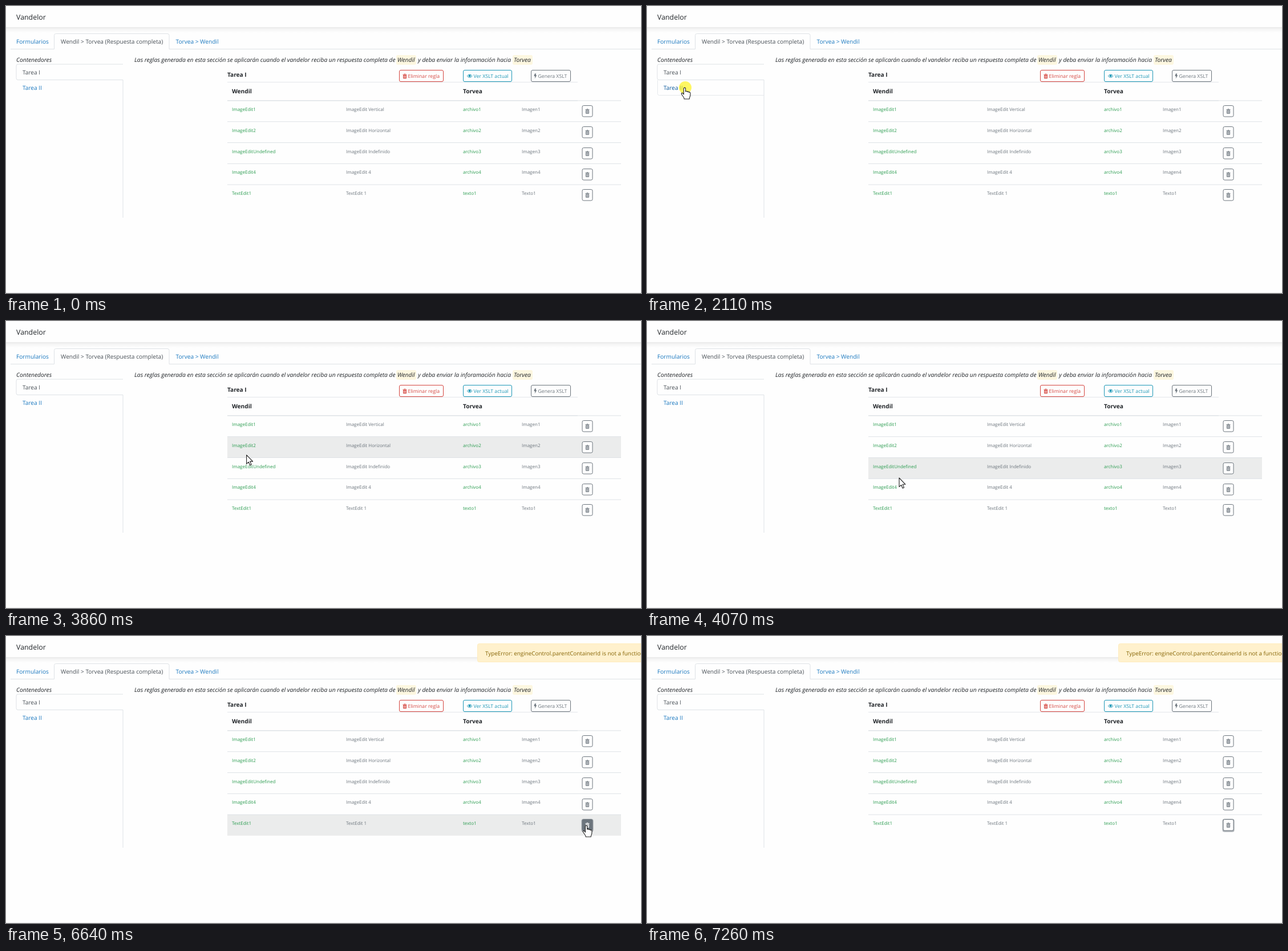
An HTML page for the animation above (8 s loop, 1113 by 503 pixels).

```html
<!DOCTYPE html>
<html lang="es">
<head>
<meta charset="utf-8">
<title>Vandelor</title>
<style>
  html, body { margin: 0; width: 100%; height: 100%; overflow: hidden; background: #fefefe; }
  svg { display: block; width: 1113px; height: 503px; }
  text { font-family: "Open Sans", "Noto Sans", sans-serif; font-size: 10.15px; white-space: pre; text-rendering: geometricPrecision; fill: #212529; }
  .title { font-size: 12.4px; }
  .link { fill: #1a78bf; }
  .link.over { fill: #0d5a9c; }
  .tab { fill: #495057; }
  .note { font-style: italic; font-size: 10.27px; }
  .bold { font-weight: 700; }
  .cell { font-size: 8px; fill: #6c757d; }
  .key { fill: #2b9c50; }
  .btn { font-size: 8.7px; fill: currentColor; }
  .toast { font-size: 9.85px; fill: #856404; }
  .mark { fill: #fdf7e0; }
  .line { fill: none; stroke: #dee2e6; }
  .frame { fill: #fefefe; stroke: currentColor; }
  .red { color: #d5453f; }
  .cyan { color: #1c97b6; }
  .grey { color: #6c757d; }
  .dark .frame { fill: #6c757d; }
  .dark .icon { color: #fff; }
  .row { fill: #ebecec; }
</style>
</head>
<body>
<svg id="stage" viewBox="0 0 1113 503">
  <defs>
    <linearGradient id="shade" x2="0" y2="1">
      <stop offset="0" stop-opacity=".08"/>
      <stop offset=".4" stop-opacity=".035"/>
      <stop offset="1" stop-opacity="0"/>
    </linearGradient>
    <path id="trash" fill="currentColor" fill-rule="evenodd"
      d="M.3 1.3H2.4L2.9 .3H5.1L5.6 1.3H7.7V2.1H.3ZM3.1 1.3H4.9L4.7 .9H3.3ZM1 2.6H7V8Q7 8.8 6.2 8.8H1.8Q1 8.8 1 8ZM2 3.5V7.7H2.7V3.5ZM3.65 3.5V7.7H4.35V3.5ZM5.3 3.5V7.7H6V3.5Z"/>
    <g id="eye">
      <path fill="none" stroke="currentColor" d="M.4 4.2C2.4 .7 6.8 .7 8.8 4.2C6.8 7.6 2.4 7.6 .4 4.2Z"/>
      <circle cx="4.6" cy="3.9" r="1.9" fill="currentColor"/>
    </g>
    <path id="bolt" fill="currentColor" d="M1.8 0H4.3L3.3 2.8H5.3L1.7 9L2.4 4.5H.4Z"/>
  </defs>
</svg>
<script>
const LOOP = 8000, STEP = 67;
const ROW_X = 388, ROW_END = 1078, ROW_Y = 165.9, ROW_H = 36.8;
const rows = [
  ["ImageEdit1", "ImageEdit Vertical", "archivo1", "Imagen1"],
  ["ImageEdit2", "ImageEdit Horizontal", "archivo2", "Imagen2"],
  ["ImageEditUndefined", "ImageEdit Indefinido", "archivo3", "Imagen3"],
  ["ImageEdit4", "ImageEdit 4", "archivo4", "Imagen4"],
  ["TextEdit1", "TextEdit 1", "texto1", "Texto1"]
];
const columns = [396, 596, 801, 904];

// Pointer moves: [time, x, y]; the pointer rests between moves.
const moves = [
  [[530, 450, 462], [740, 330, 330], [1000, 150, 185], [1140, 85, 150], [1270, 66, 143]],
  [[2910, 72, 144], [3245, 309, 182], [3660, 400, 196]],
  [[3730, 408, 208], [4065, 442, 275], [4280, 449, 319.5]],
  [[4480, 475, 321], [4748, 955, 328], [4890, 1005, 331], [5030, 1017, 332]],
  [[6640, 1017, 332], [6850, 1040, 270], [7120, 1094, 110], [7250, 1125, 45]]
];

const stage = document.getElementById("stage");

function add(name, attrs, parent = stage) {
  const node = document.createElementNS("http://www.w3.org/2000/svg", name);
  for (const key in attrs) node.setAttribute(key, attrs[key]);
  parent.append(node);
  return node;
}
function write(x, y, string, cls = "", parent = stage) {
  const node = add("text", { x, y, class: cls }, parent);
  node.textContent = string;
  return node;
}
const box = (x, y, width, height, attrs = {}, parent = stage) =>
  add("rect", { x, y, width, height, ...attrs }, parent);
const path = (d, attrs = {}, parent = stage) => add("path", { d, ...attrs }, parent);
const icon = (name, x, y, parent) =>
  add("use", { href: "#" + name, class: "icon", transform: `translate(${x} ${y})` }, parent);
const show = (node, on) => node.setAttribute("visibility", on ? "visible" : "hidden");

// Header and tabs
box(0, 0, 1113, 503, { fill: "#fefefe" });
box(0, 502, 1113, 1, { fill: "#f1f1f1" });
box(0, 37, 1113, 10, { fill: "url(#shade)" });
write(18, 23.5, "Vandelor", "title");
path("M8 75.5H84.5V51.5Q84.5 48.5 87.5 48.5H283Q286 48.5 286 51.5V75.5H1113", { class: "line" });
write(18, 66, "Formularios", "link");
write(96, 66, "Wendil > Torvea (Respuesta completa)", "tab");
write(297.5, 66, "Torvea > Wendil", "link");

// Side list
write(18, 98, "Contenedores", "note");
path("M205 102H21Q18 102 18 105V126.5Q18 129.5 21 129.5H205V371", { class: "line" });
const itemFrame = path("M18.5 130V153.5Q18.5 156.5 21.5 156.5H205", { class: "line", "stroke-opacity": .75 });
write(29, 120, "Tarea I", "tab");
const item = write(29, 147, "Tarea II", "link");

// Explanation
box(684, 86, 35, 17, { rx: 3, class: "mark" });
box(888, 86, 35, 17, { rx: 3, class: "mark" });
write(225, 98, "Las reglas generada en esta sección se aplicarán cuando el vandelor reciba un respuesta completa de", "note");
write(686, 98, "Wendil", "note");
write(722, 98, "y deba enviar la inforamación hacia", "note");
write(890, 98, "Torvea", "note");

// Table
write(388, 124, "Tarea I", "bold");
path("M388 133.5H1002", { class: "line", "stroke-opacity": .8 });
write(396, 153.3, "Wendil", "bold");
write(801, 153.3, "Torvea", "bold");

function button(color, x, width, name, iconX, textX, label) {
  const g = add("g", { class: color });
  box(x, 112.5, width, 20, { rx: 2.5, class: "frame" }, g);
  icon(name, iconX, 118.5, g);
  write(textX, 126.3, label, "btn", g);
}
button("red", 689.5, 77, "trash", 695, 704.5, "Eliminar regla");
button("cyan", 801.5, 85, "eye", 808, 819.5, "Ver XSLT actual");
button("grey", 920.5, 69, "bolt", 925, 932.5, "Genera XSLT");

const rowFills = rows.map((cells, i) => {
  const top = ROW_Y + i * ROW_H;
  const fill = box(ROW_X, top, ROW_END - ROW_X, ROW_H, { class: "row" });
  path(`M${ROW_X} ${top}H${ROW_END}`, { class: "line" });
  cells.forEach((label, c) =>
    write(columns[c], top + 18.1, label, c % 2 ? "cell" : "cell key"));
  return fill;
});
path(`M388 ${ROW_Y}H1002`, { class: "line" });

const ring = box(1008.5, 320.5, 21, 23, { rx: 3.5, fill: "#6c757d", "fill-opacity": .55 });
const bins = rows.map((_, i) => {
  const g = add("g", { class: "grey" }), y = Math.round(174.2 + i * ROW_H) + .5;
  box(1010, y, 18, 19.5, { rx: 2.5, class: "frame" }, g);
  icon("trash", 1015, y + 5.5, g);
  return g;
});

// Message
const toast = add("g", {});
box(826.5, 13.5, 320, 32, { rx: 3, fill: "#fff1cd", stroke: "#ffecbc" }, toast);
write(840, 33.5, "TypeError: engineControl.parentContainerId is not a function", "toast", toast);

// Pointer
const glow = add("circle", { cx: 67, cy: 143, r: 11, fill: "#fdf326" });
const pointer = add("g", { "stroke-linejoin": "round" });
const ink = { fill: "#fff", stroke: "#222", "stroke-width": 1.1 };
const shapes = {
  arrow: path("M0 0V15.6L3.6 12.3L6 18L8.5 16.9L6.1 11.3H11Z", ink, pointer),
  hand: path("M-1.6 1.8C-1.6-.4 1.6-.4 1.6 1.8V7C2 5.9 4.4 6 4.6 7.6C5 6.4 7.2 6.6 7.4 8.4C8 7.4 9.9 7.8 9.9 9.4V13C9.9 15.6 8.4 16.6 8.2 20H-.8C-.9 16.6-3.8 14.8-5.4 11.5C-6.4 9.5-4.2 8.8-3 10.2L-1.6 12Z", ink, pointer),
  beam: path("M-4-7.5H4M0-7.5V7.5M-4 7.5H4", { fill: "none", stroke: "#111", "stroke-width": 1.7 }, pointer)
};

function locate(t) {
  const move = moves.filter(m => m[0][0] <= t).pop();
  if (!move) return null;
  const start = move[0][0];
  const held = start + STEP * Math.floor((t - start + 5) / STEP);
  const next = move.findIndex(k => k[0] > held);
  if (next < 0) return move[move.length - 1].slice(1);
  const [t0, x0, y0] = move[next - 1], [t1, x1, y1] = move[next];
  const p = (held - t0) / (t1 - t0);
  return [x0 + (x1 - x0) * p, y0 + (y1 - y0) * p];
}

function draw(t) {
  const spot = t < 7250 ? locate(t) : null;
  const [x, y] = spot || [-100, -100];
  const onItem = x > 18 && x < 205 && y > 129 && y < 157;
  const row = x > ROW_X && x < ROW_END ? Math.floor((y - ROW_Y) / ROW_H) : -1;
  const bin = x > 1010 && x < 1028 ? row : -1;
  const kind = onItem || bin === 4 ? "hand" : row === 4 && x > 900 && x < 1000 ? "beam" : "arrow";

  pointer.setAttribute("transform", `translate(${x} ${y})`);
  for (const name in shapes) shapes[name].style.display = name === kind ? "" : "none";
  rowFills.forEach((node, i) => show(node, i === row));
  bins.forEach((node, i) => node.classList.toggle("dark", i === bin));

  item.classList.toggle("over", onItem);
  show(itemFrame, onItem || (t > 2900 && t < 3310));
  show(ring, t >= 5360);
  glow.setAttribute("opacity", t < 1340 ? 0 : t < 2570 ? .72 : t < 2640 ? .45 : t < 2705 ? .2 : 0);
  toast.setAttribute("opacity", t < 5360 ? 0 : t < 5430 ? .35 : t < 5495 ? .7 : 1);
}

const begin = performance.now();
function tick() {
  draw((performance.now() - begin) % LOOP);
  requestAnimationFrame(tick);
}
draw(0);
requestAnimationFrame(tick);
</script>
</body>
</html>
```
